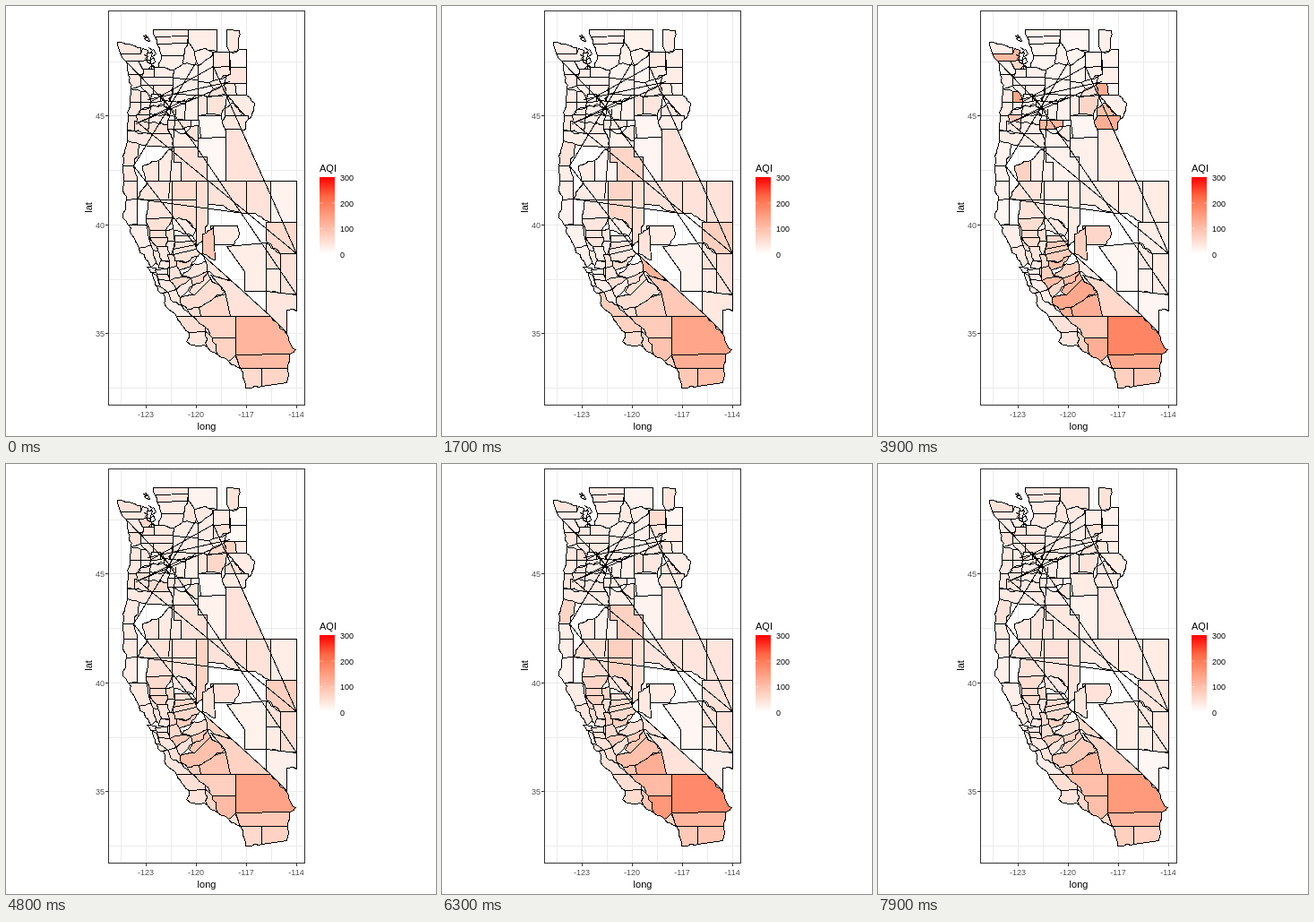
These frames come from a looping animation (480x480 px, 8000 ms). An HTML page:

```html
<!DOCTYPE html>
<html lang="en">
<head>
<meta charset="utf-8">
<title>AQI map</title>
<style>
html, body { margin: 0; width: 100%; height: 100%; overflow: hidden; background: #fff; }
svg { display: block; width: 100vw; height: 100vh; font: 9px "Liberation Sans", Arial, sans-serif; }
.grid, #map, .ticks, .frame { shape-rendering: crispEdges; fill: none; }
.grid { stroke: #ebebeb; }
#map { stroke: #000; stroke-linejoin: round; }
.frame, .ticks { stroke: #333; }
.axis { fill: #4d4d4d; }
.title { font-size: 11px; }
</style>
</head>
<body>
<svg viewBox="0 0 480 480">
<defs><linearGradient id="ramp" x1="0" y1="1" x2="0" y2="0">
<stop stop-color="#fff"/><stop offset=".25" stop-color="#ffcfbf"/><stop offset=".5" stop-color="#ff9e81"/>
<stop offset=".75" stop-color="#ff6846"/><stop offset="1" stop-color="#f00"/>
</linearGradient></defs>
<path class="grid" d="M128.5 5V445M156.5 5V445M184.5 5V445M212.5 5V445M240.5 5V445M268.5 5V445M296.5 5V445M324.5 5V445M114 62.5H334M114 122.5H334M114 183.5H334M114 244.5H334M114 305.5H334M114 365.5H334M114 426.5H334"/>

<g id="map" transform="translate(.5 .5)">
<!-- Washington -->
<g data-v="28 22 25 20 35 30 35">
<path d="M164 26 203 26 203 33 166 34z"/>
<path d="M166 34 203 33 202 41 168 42z"/>
<path d="M168 42 202 41 198 55 173 55z"/>
<path d="M173 55 198 55 197 64 187 71 170 68z"/>
<path d="M165 68 170 68 187 71 186 79 163 79z"/>
<path d="M124 40 133 42 143 44 150 46 150 53 127 53z"/>
<path d="M127 53 150 53 152 47 158 49 157 61 133 61z" data-v="30 25 95 110 35 25 30"/>
<path d="M133 61 147 61 157 74 150 76 136 76z"/>
<path d="M147 61 160 60 162 70 152 70z" data-v="25 25 150 60 60 25 30"/>
<path d="M153 70 165 70 165 80 151 79z"/>
<path d="M157 52 163 52 161 64 157 62z"/>
<path d="M136 76 150 76 150 88 139 92z"/>
<path d="M150 79 186 79 186 88 150 88z"/>
<path d="M150 88 164 88 165 100 158 98z"/>
<path d="M162 98 172 98 172 108 161 106z"/>
<path d="M164 88 186 88 182 107 172 108 172 98 164 98z"/>
<path d="M203 26 235 26 235 51 222 47 210 50 203 40z" data-v="28 22 18 12 18 18 40"/>
<path d="M203 40 210 50 214 66 197 64 198 55z"/>
<path d="M210 50 222 47 231 51 225 62 214 66z"/>
<path d="M187 71 197 64 214 66 214 82 186 80z"/>
<path d="M186 80 214 82 214 99 186 98z"/>
<path d="M186 98 214 99 200 106 182 107z"/>
<path d="M214 84 226 85 231 92 224 101 214 99z"/>
<path d="M214 66 231 54 231 83 226 85 214 84z"/>
<path d="M231 51 249 51 249 67 231 68z" data-v="35 32 25 18 30 55 28"/>
<path d="M231 68 249 67 250 76 231 83z"/>
<path d="M231 83 245 78 244 88 231 92 226 85z"/>
<path d="M231 92 244 88 246 99 224 101z" data-v="45 35 40 45 60 35 42"/>
<path d="M244 85 254 86 257 99 246 99z" data-v="35 30 35 130 70 40 36"/>
<path d="M254 86 268 86 268 99 257 99z"/>
<path d="M250 68 268 68 268 86 244 86 245 78 250 76z" data-v="40 28 25 25 10 30 25"/>
<path d="M249 51 268 48 268 68 250 68z" data-v="12 25 20 18 8 15 20"/>
<path d="M246 26 260 27 258 50 249 51 246 44z"/>
<path d="M154 36 158 34 160 39 156 38z"/>
<path d="M153 33 156 32 157 35z"/>
</g>
<!-- Oregon -->
<g data-v="36 28 32 28 36 33 34">
<path d="M139 92 150 95 150 107 138 107z"/>
<path d="M150 95 158 97 161 107 150 107z" data-v="35 30 35 140 40 50 30"/>
<path d="M138 107 150 107 152 114 146 122 136 122z"/>
<path d="M150 107 161 107 160 113 150 115z"/>
<path d="M161 107 176 104 176 110 160 112z"/>
<path d="M150 115 161 113 160 121 146 122z"/>
<path d="M161 112 176 110 182 122 160 120z"/>
<path d="M176 105 184 106 182 113 176 112z"/>
<path d="M184 106 200 109 199 127 182 122z"/>
<path d="M145 121 160 121 159 130 143 128z" data-v="50 45 42 90 50 45 42"/>
<path d="M160 120 182 122 180 132 159 130z"/>
<path d="M136 122 145 122 143 139 135 138z" data-v="45 38 30 24 44 40 34"/>
<path d="M143 128 159 130 158 142 143 139z"/>
<path d="M159 130 180 132 184 142 158 144z" data-v="45 32 30 26 55 34 34"/>
<path d="M135 139 158 142 184 142 187 157 160 156 135 152z"/>
<path d="M135 150 148 154 147 163 142 178 130 178 132 163z" data-v="42 45 32 18 34 65 45"/>
<path d="M130 178 142 178 146 195 131 195z" data-v="40 28 24 20 36 28 34"/>
<path d="M152 178 170 172 170 195 155 195z" data-v="38 30 32 70 40 34 34"/>
<path d="M170 172 176 166 187 157 187 174 195 174 195 195 170 195z" data-v="32 15 26 25 32 22 40"/>
<path d="M187 157 214 157 214 168 224 168 224 195 195 195 195 174 187 174z" data-v="45 65 35 20 45 72 36"/>
<path d="M180 137 200 142 214 150 214 157 187 157z"/>
<path d="M180 127 206 127 206 134 196 137 180 137z" data-v="40 35 110 110 40 35 30"/>
<path d="M206 134 214 133 214 150 198 142z"/>
<path d="M200 107 214 99 214 127 199 127z"/>
<path d="M214 99 224 101 224 120 214 122z" data-v="40 45 25 28 42 48 34"/>
<path d="M224 101 248 99 244 113 240 122 224 120z" data-v="46 40 28 65 62 38 42"/>
<path d="M244 113 254 108 264 119 260 123 244 122z" data-v="40 35 30 100 48 40 36"/>
<path d="M248 99 268 99 272 102 277 108 274 120 270 126 254 108z"/>
<path d="M244 122 270 122 267 137 246 140 240 128z" data-v="36 25 25 125 30 35 30"/>
<path d="M214 122 240 122 245 140 245 146 217 147z" data-v="10 14 14 15 12 14 30"/>
<path d="M214 147 245 146 245 195 224 195 224 168 214 168z" data-v="12 14 18 24 22 18 22"/>
<path d="M245 137 262 137 288 195 245 195z" data-v="45 45 40 30 45 38 34"/>
</g>
<!-- Nevada -->
<g data-v="40 40 35 30 40 38 34">
<path d="M212 195 225 195 225 240 219 262 212 268z" data-v="52 50 30 30 68 50 42"/>
<path d="M225 195 268 195 268 231 250 228 242 222 225 221z" data-v="45 45 38 30 45 40 32"/>
<path d="M268 195 295 195 295 241 278 231 268 231z" data-v="45 45 38 30 45 40 32"/>
<path d="M295 195 324 195 324 241 295 241z" data-v="18 45 36 30 28 40 30"/>
<path d="M290 241 324 241 324 276 306 276 290 262z" data-v="58 75 30 28 75 45 42"/>
<path d="M228 245 258 245 260 254 254 266 228 266z" data-v="30 30 30 62 45 30 45"/>
<path d="M219 254 231 246 233 283 219 276z" data-v="85 45 40 75 45 35 40"/>
<path d="M246 268 290 264 290 318 266 318 266 296z" data-v="28 18 15 16 22 15 28"/>
<path d="M290 264 306 276 306 293 290 293z"/>
<path d="M306 276 324 276 324 322 306 320z" data-v="45 45 30 30 50 45 35"/>
<path d="M290 293 306 293 306 320 290 318z"/>
<path d="M290 318 324 322 324 340 320 338 313 339 313 364 290 342z" data-v="38 35 60 15 25 25 12"/>
</g>
<!-- Northern California -->
<g data-v="40 33 38 44 48 55 45">
<path d="M131 195 146 195 146 215 134 216 130 206z" data-v="38 28 28 20 34 28 32"/>
<path d="M157 195 185 195 185 216 160 216 146 215z"/>
<path d="M185 195 212 195 212 216 185 216z" data-v="55 65 25 25 45 75 45"/>
<path d="M134 216 146 215 146 243 136 244 130 236z" data-v="24 20 20 15 28 22 24"/>
<path d="M160 216 185 216 185 236 156 237z"/>
<path d="M185 216 212 216 212 250 200 238 185 236z" data-v="52 62 25 28 45 70 40"/>
<path d="M156 237 185 236 178 250 160 250z"/>
<path d="M185 236 200 238 211 248 208 256 186 250z"/>
<path d="M136 244 156 244 162 267 148 270 140 255z" data-v="25 18 28 25 35 30 25"/>
<path d="M160 250 178 250 180 258 160 258z"/>
<path d="M178 250 186 248 188 262 180 262z"/>
<path d="M160 258 168 262 172 278 162 274z"/>
<path d="M160 258 180 258 180 268 168 268z"/>
<path d="M180 262 188 262 184 278 178 276z"/>
<path d="M148 270 162 267 170 286 162 291 155 282z"/>
<path d="M164 272 174 276 174 290 168 288z"/>
<path d="M168 268 180 268 182 284 174 284z"/>
<path d="M180 277 190 278 190 290 182 292z"/>
<path d="M172 284 182 285 180 293 170 292z"/>
</g>
<!-- Bay and central coast -->
<g data-v="30 25 26 25 38 40 34">
<path d="M157 291 167 292 167 297 161 297z"/>
<path d="M166 294 180 293 180 299 168 299z"/>
<path d="M168 299 180 299 182 306 170 305z"/>
<path d="M163 298 168 300 172 313 166 311z"/>
<path d="M170 305 182 306 190 316 180 319 172 313z"/>
<path d="M166 311 172 313 180 319 172 320z"/>
<path d="M180 319 190 316 194 325 196 334 186 330z"/>
<path d="M175 320 180 319 186 330 196 334 208 346 190 346 178 335z" data-v="26 78 35 22 40 45 25"/>
<path d="M190 346 208 346 222 358 222 363 204 364 198 358z" data-v="50 70 55 45 48 50 52"/>
<path d="M204 364 222 363 224 380 206 378 201 374z" data-v="36 55 40 38 42 55 42"/>
</g>
<!-- Sierra and San Joaquin Valley -->
<g data-v="45 40 65 80 62 60 55">
<path d="M188 256 208 256 212 262 188 263z"/>
<path d="M188 263 212 262 211 266 186 271z"/>
<path d="M186 271 211 266 212 271 186 277z"/>
<path d="M186 277 212 271 216 276 200 286 188 284z"/>
<path d="M190 284 200 286 212 279 206 290 190 296z"/>
<path d="M182 292 190 290 196 302 182 306z"/>
<path d="M182 306 196 302 206 303 190 316z"/>
<path d="M196 301 206 290 222 284 224 296 206 303z"/>
<path d="M216 275 252 307 244 305 224 296 222 284z" data-v="40 118 45 30 70 45 60"/>
<path d="M206 303 224 296 220 306 208 312z"/>
<path d="M190 316 206 303 208 312 194 325z"/>
<path d="M204 318 208 312 220 306 224 296 228 304 210 322z" data-v="45 50 90 110 88 85 65"/>
<path d="M194 325 210 322 228 304 244 318 232 325 214 336 202 338 196 334z" data-v="52 52 105 135 98 98 80"/>
<path d="M202 338 214 336 218 346 208 346z" data-v="50 50 95 120 75 90 65"/>
<path d="M214 336 232 325 246 320 250 346 218 346z" data-v="60 72 130 125 90 125 115"/>
<path d="M228 300 252 307 295 346 250 346 244 318z" data-v="45 85 45 60 70 45 65"/>
</g>
<!-- Southern California -->
<g data-v="65 90 85 80 65 95 80">
<path d="M208 346 256 346 256 370 230 370 222 358z" data-v="65 80 105 80 75 105 100"/>
<path d="M222 363 230 370 236 389 228 385 224 380z" data-v="50 60 85 70 65 90 60"/>
<path d="M230 370 256 370 256 389 248 396 236 389z" data-v="70 95 105 125 105 160 100"/>
<path d="M256 346 295 346 302 353 315 370 318 378 323 383 316 388 256 389z" data-v="115 140 143 185 142 178 155"/>
<path d="M248 396 256 389 262 404 258 403z"/>
<path d="M256 389 316 388 314 404 261 404z" data-v="105 125 115 135 85 115 110"/>
<path d="M261 404 285 404 285 424 267 426 264 414z" data-v="58 85 85 75 60 85 75"/>
<path d="M285 404 314 404 315 412 313 420 285 424z" data-v="65 100 70 85 70 90 70"/>
</g>
<!-- Straight joins between separate outlines -->
<path d="M231 67 324 276 147 130M324 322 172 98M142 178 212 62M142 178 212 268M146 215 265 231M181 215 189 115M133 61 188 118M158 104 250 84M145 131 240 90M160 107 231 67M147 130 200 104"/>
<path d="M154 54 158 56 155 58 160 61 164 57 166 62 162 65 166 68 161 67 158 71M164 48 167 53 163 56 166 60M159 46 163 49 160 53"/>
</g>

<path class="frame" d="M114.5 5.5H333.5V445.5H114.5z"/>
<path class="ticks" d="M156.5 446v3M212.5 446v3M268.5 446v3M324.5 446v3M111 122.5h3M111 244.5h3M111 365.5h3"/>
<g class="axis" text-anchor="middle"><text x="156" y="459">-123</text><text x="212" y="459">-120</text><text x="268" y="459">-117</text><text x="324" y="459">-114</text></g>
<g class="axis" text-anchor="end"><text x="110" y="126">45</text><text x="110" y="248">40</text><text x="110" y="369">35</text></g>
<g class="title"><text x="224" y="473" text-anchor="middle">long</text><text transform="translate(96 225) rotate(-90)" text-anchor="middle">lat</text><text x="350" y="185">AQI</text></g>
<path fill="url(#ramp)" d="M350 191h17v86h-17z"/>
<path stroke="#fff" stroke-width=".4" d="M350 248.5h3.5M363.5 248.5h3.5M350 220h3.5M363.5 220h3.5"/>
<text x="373" y="195">300</text><text x="373" y="224">200</text><text x="373" y="252">100</text><text x="373" y="281">0</text>
</svg>
<script>
const LOOP = 8000, DAY = 100;
const keyDays = [0, 17, 28, 39, 48, 63, 79];
const ramp = [[255, 255], [207, 191], [158, 129], [104, 70], [0, 0]];
const rand = n => { const s = Math.sin(n * 12.9898) * 43758.5453; return s - Math.floor(s); };

function colour(aqi) {
  const p = Math.max(0, Math.min(3.999, aqi / 75)), i = Math.floor(p);
  const [g, b] = ramp[i].map((c, k) => Math.round(c + (ramp[i + 1][k] - c) * (p - i)));
  return `rgb(255,${g},${b})`;
}

// Roughens short slanted borders; neighbours get the same line in either direction.
function border(a, b) {
  const flip = a[0] > b[0] || (a[0] === b[0] && a[1] > b[1]);
  const [p, q] = flip ? [b, a] : [a, b];
  const dx = q[0] - p[0], dy = q[1] - p[1], len = Math.hypot(dx, dy);
  if (Math.abs(dx) < 1.5 || Math.abs(dy) < 1.5 || len > 24) return [a];
  const n = Math.floor(len / 3.5), mids = [];
  for (let i = 1; i < n; i++) {
    const off = (rand(p[0] * 3 + p[1] * 7 + q[0] * 11 + q[1] + i) - .5) * 3 / len;
    mids.push([p[0] + dx * i / n - dy * off, p[1] + dy * i / n + dx * off]);
  }
  return [a, ...(flip ? mids.reverse() : mids)];
}

const regions = [...document.querySelectorAll('#map g path')].map((el, id) => {
  const nums = el.getAttribute('d').match(/\d+/g).map(Number), pts = [];
  for (let i = 0; i < nums.length; i += 2) pts.push([nums[i], nums[i + 1]]);
  const line = pts.flatMap((p, i) => border(p, pts[(i + 1) % pts.length]));
  el.setAttribute('d', 'M' + line.map(p => p.map(v => v.toFixed(1))).join(' ') + 'z');
  const own = el.dataset.v, scale = own ? 1 : .7 + .6 * rand(id + 5);
  const levels = (own || el.parentNode.dataset.v).split(' ').map(v => v * scale);
  return { el, id, levels };
});

// Levels drift between key days, with a small daily scatter.
function paint(day) {
  let k = 0;
  while (k < keyDays.length - 2 && day >= keyDays[k + 1]) k++;
  const u = (day - keyDays[k]) / (keyDays[k + 1] - keyDays[k]);
  for (const { el, id, levels } of regions) {
    const scatter = 1 + (rand(id * 81 + day) - .5) * .3 * Math.sin(Math.PI * u);
    el.setAttribute('fill', colour((levels[k] + (levels[k + 1] - levels[k]) * u) * scatter));
  }
}

let shown = 0;
const start = performance.now();
function tick() {
  const day = Math.floor((performance.now() - start) % LOOP / DAY);
  if (day !== shown) paint(shown = day);
  requestAnimationFrame(tick);
}
paint(0);
tick();
</script>
</body>
</html>
```
